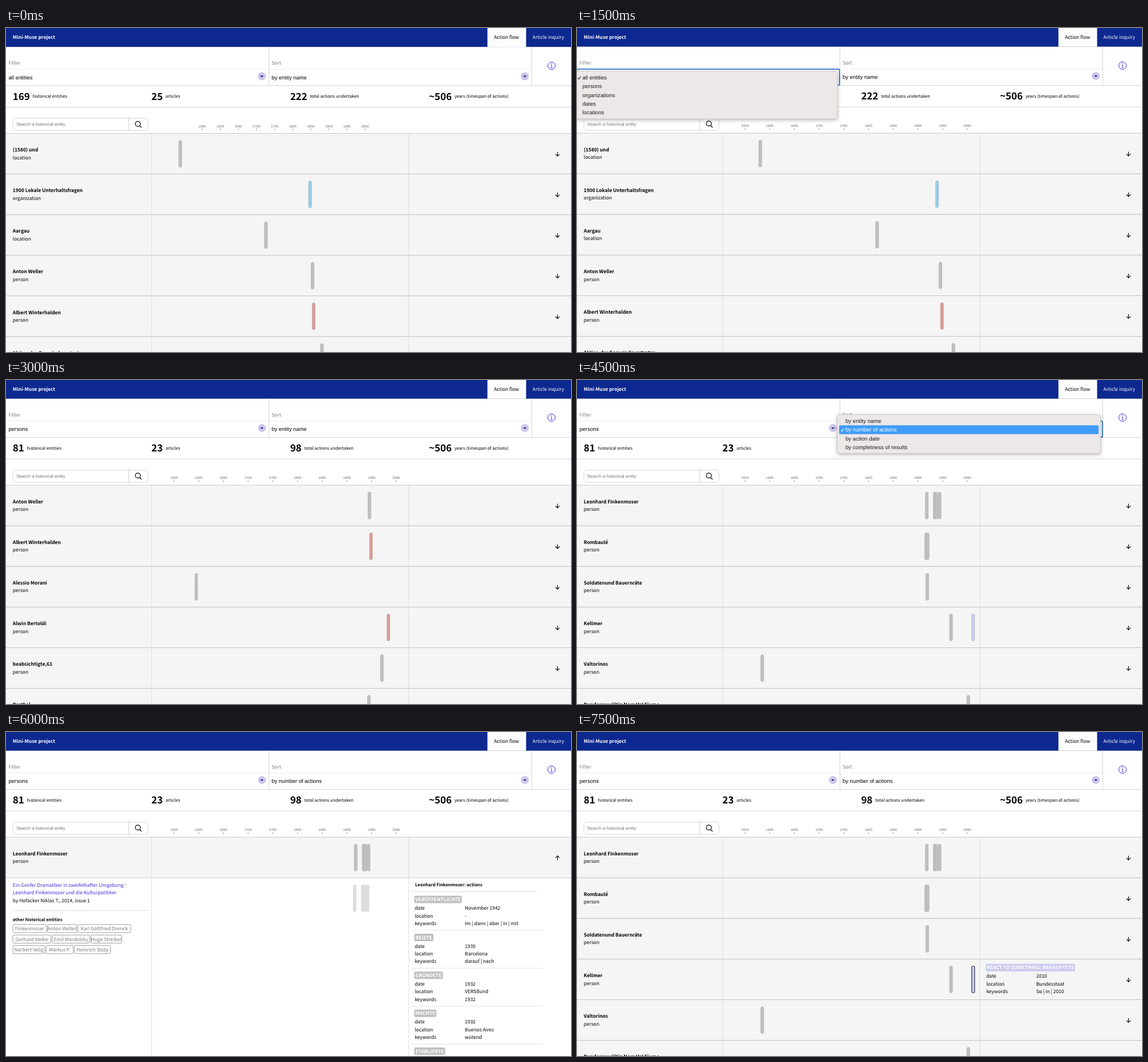
Recreate the animation shown at these times as an HTML page. Size 987 px wide and 567 px high, loop 9000 ms.

```html
<!DOCTYPE html>
<html lang="en">
<head>
<meta charset="utf-8">
<title>Action flow</title>
<style>
  html, body { margin: 0; width: 100%; height: 100%; overflow: hidden; background: #fff; }
  svg { display: block; width: 987px; height: 567px; }
  text { font: 8.43px "Noto Sans CJK JP", "Noto Sans CJK SC", "Noto Sans CJK", sans-serif; text-rendering: geometricPrecision; white-space: pre; }
  .bold { font-weight: 700; }
  .note { font-size: 7.55px; }
  .noteBold { font-size: 7.55px; font-weight: 700; }
  .count { font-size: 16.87px; font-weight: 700; }
  .control, .option, .hint, .year { font-family: "Liberation Sans", Arial, sans-serif; }
  .control { font-size: 9.43px; }
  .option { font-size: 9.62px; }
  .hint { font-size: 7.85px; }
  .year { font-size: 5.89px; text-anchor: middle; }
  .chip { text-anchor: middle; }
  .menu { filter: drop-shadow(0 2px 3px rgba(0, 0, 0, .28)); }
</style>
</head>
<body>
<svg id="stage" viewBox="0 0 987 567"></svg>
<script>
const STEP = 1500;
const TOP = 184.1, ROW = 71.1;
const GREY = '#c0c0c0', BLUE = '#8fcff0', RED = '#dc9a97', LILAC = '#cacaee';

const escapeText = s => s.replace(/&/g, '&amp;').replace(/</g, '&lt;');
const text = (x, y, s, cls = '', fill = '#000') =>
  `<text x="${x}" y="${y}" class="${cls}" fill="${fill}">${escapeText(s)}</text>`;
const rect = (x, y, w, h, fill, extra = '') =>
  `<rect x="${x}" y="${y}" width="${w}" height="${h}" fill="${fill}" ${extra}/>`;
const path = (d, stroke, width = 1, extra = '') =>
  `<path d="${d}" fill="none" stroke="${stroke}" stroke-width="${width}" ${extra}/>`;
const hline = (x1, x2, y, color = '#c8c8c8', width = .8) => path(`M${x1} ${y}H${x2}`, color, width);
const vline = (x, y1, y2, color = '#c8c8c8', width = .8) => path(`M${x} ${y1}V${y2}`, color, width);

function header() {
  return rect(0, -2, 987, 34.7, '#0d298f') + rect(841, -2, 67.6, 34.7, '#fcfcfd') +
    text(11.8, 19, 'Mini-Muse project', 'bold', '#fff') +
    text(852.4, 19, 'Action flow') + text(919.8, 19, 'Article inquiry', '', '#fff');
}

function select(x, label, value) {
  return text(x + 4.6, 63.8, label, '', '#777') + text(x + 4.6, 89.4, value, 'control') +
    `<circle cx="${x + 447}" cy="84.1" r="7" fill="#cdc6ec"/>` +
    `<path d="M${x + 444} 82.9h6l-3 3.2z" fill="#32207c"/>`;
}

function controls(filter, sort) {
  return select(0, 'Filter', filter) + select(459.4, 'Sort', sort) +
    hline(0, 918.5, 71.8, '#e9e9e9') + vline(459.3, 32.7, 100.5) + vline(918.5, 32.7, 100.5) +
    hline(0, 987, 100.5) +
    '<circle cx="953" cy="65.8" r="6.5" fill="none" stroke="#3b2bd6"/>' +
    '<circle cx="953" cy="62.5" r=".85" fill="#3b2bd6"/>' +
    path('M951.7 64.9H953.2V69.2M951.4 69.2H954.7', '#3b2bd6', .9);
}

function stats(entities, articles, actions) {
  const items = [[11.8, entities, 'historical entities'], [254, articles, 'articles'],
    [496.4, actions, 'total actions undertaken'], [738.8, '~506', 'years (timespan of actions)']];
  return items.map(([x, n, label]) =>
    text(x, 125.2, n, 'count') + text(x + n.length * 9.95 + 4.8, 121.8, label, 'note')).join('') +
    hline(0, 987, 138);
}

function search() {
  return rect(12, 157.4, 236, 21.6, '#fff', 'rx="5" stroke="#c8c8c8" stroke-width=".8"') +
    vline(214.5, 157.4, 179) + text(18, 170.9, 'Search a historical entity', 'hint', '#757575') +
    '<circle cx="230.3" cy="167.3" r="4.4" fill="none" stroke="#000" stroke-width="1.2"/>' +
    path('M233.4 170.5L236.7 174', '#000', 1.2);
}

function axis(start, gap) {
  return Array.from({ length: 10 }, (_, i) => {
    const x = start + i * gap;
    return text(x, 173.3, String(1550 + i * 50), 'year', '#666') + vline(x, 175.1, 178.6, '#777', .7);
  }).join('');
}

function bar(x, top, fill = GREY, stroke = '#a9a9a9', width = .6) {
  return rect(x - 2.6, top + 12.2, 5.2, 47, fill, `rx="2.4" stroke="${stroke}" stroke-width="${width}"`);
}

function beads(x, top) {
  return Array.from({ length: 13 }, (_, i) =>
    rect(x - 2.6, top + 12.2 + i * 3.58, 5.2, 4, GREY, 'rx="2" stroke="#a9a9a9" stroke-width=".5"')).join('');
}

function arrow(top, up) {
  const y = top + 36.2, s = up ? -1 : 1;
  return path(`M963.4 ${y - 3.7 * s}V${y + 3.5 * s}M959.9 ${y + .1 * s}L963.4 ${y + 3.6 * s}L966.9 ${y + .1 * s}`, '#000', 1.15);
}

// A mark is [x, colour, beaded]
function row([name, type, ...marks], i, open) {
  const y = TOP + i * ROW;
  return rect(0, y, 987, ROW, '#f5f5f5') + vline(254.4, y, y + ROW, '#dadada') + vline(703.5, y, y + ROW, '#dadada') +
    hline(0, 987, y, '#bdbdbd') + hline(0, 987, y + ROW, '#bdbdbd') +
    text(11.8, y + 31.7, name, 'bold') + text(11.8, y + 45.1, type) +
    marks.map(([x, fill, beaded]) => beaded ? beads(x, y) : bar(x, y, fill)).join('') + arrow(y, open);
}
const rows = list => list.map((r, i) => row(r, i)).join('');

function menu(x, y, w, options, checked, highlight) {
  const h = options.length * 15.3 + 6.8;
  return `<g class="menu">${rect(x, y, w, h, '#ece8e7', 'rx="3.5" stroke="#bdb9b8" stroke-width=".6"')}</g>` +
    options.map((label, i) => {
      const mid = y + 11 + i * 15.3, on = i === checked, color = on && highlight ? '#fff' : '#1c1c1c';
      return (on && highlight ? rect(x + 3.3, mid - 7.6, w - 6.6, 15.5, '#419cf9', 'rx="2.5"') : '') +
        (on ? path(`M${x + 6.6} ${mid + .9}l1.7 2.1l3.1-4.9`, color, 1.1) : '') +
        text(x + 14.4, mid + 3.5, label, 'option', color);
    }).join('');
}
const focusRing = x => rect(x, 71.9, 459, 28.2, 'none', 'rx="1.5" stroke="#0f62cf" stroke-width="1.5"');

function badge(x, mid, w, label, fill) {
  return rect(x, mid - 6.5, w, 13, fill, 'rx="2"') +
    `<text x="${x + w / 2}" y="${mid + 3.1}" class="bold chip" fill="#fff">${label}</text>`;
}

function action(x, mid, valueX, [label, w, ...values], fill = GREY) {
  return badge(x, mid, w, label, fill) + ['date', 'location', 'keywords'].map((key, i) => {
    const y = mid + 18.2 + i * 13.3;
    return text(x + .7, y, key) + text(valueX, y, values[i]);
  }).join('');
}

function details() {
  const chips = [
    [12, 58.5, 'Finkenmoser'], [72.5, 50.8, 'Anton Weller'], [125.5, 92.5, 'Karl Gottfried Drenck'],
    [12, 66.6, 'Gerhard Melke'], [81, 65, 'Emil Wardolsky'], [148.3, 54, 'Hugo Streiber'],
    [12, 56, 'Norbert Velig'], [70, 47.4, 'Markus P.'], [119.6, 63, 'Heinrich Stolp']];
  const actions = [
    ['VERÖFFENTLICHTE', 83, 'November 1942', '-', 'Im | dann | aber | in | mit'],
    ['REISTE', 33.4, '1935', 'Barcelona', 'darauf | nach'],
    ['GRÜNDETE', 50, '1932', 'VERSBund', '1932'],
    ['MACHTE', 38.5, '1932', 'Buenos Aires', 'wütend'],
    ['ETABLIERTE', 54, '', '', '']];
  const y = TOP + ROW;
  return vline(254.4, y, 567, '#dadada') + vline(703.5, y, 567, '#dadada') +
    text(11.8, 270.9, 'Ein Genfer Dramatiker in zweifelhafter Umgebung :', '', '#3c2bdd') +
    text(11.8, 284.3, 'Leonhard Finkenmoser und die Kulturpolitiker', '', '#3c2bdd') +
    text(11.8, 298.2, 'by Hofacker Niklas T., 2014, issue 1') +
    hline(12, 248, 312.5, '#d5d5d5') + text(11.8, 331, 'other historical entities', 'noteBold') +
    chips.map(([x, w, label], i) => {
      const mid = 344 + Math.floor(i / 3) * 18.35;
      return rect(x, mid - 7.1, w, 14.2, '#fff', 'rx="2.2" stroke="#858585" stroke-width=".8"') +
        text(x + w / 2, mid + 3.2, label, 'chip', '#777');
    }).join('') +
    [609.2, 623.3, 625.9, 631.7].map(x => bar(x, y, '#dedede', '#d0d0d0')).join('') +
    text(714.8, 270.2, 'Leonhard Finkenmoser: actions', 'noteBold') + hline(709, 928, 279.5, '#dadada') +
    actions.map((a, i) => {
      const mid = 293 + i * 66.4;
      return action(713.2, mid, 801.6, a) + hline(709, 938, mid + 53.9, '#dadada');
    }).join('');
}

const anton = ['Anton Weller', 'person'], albert = ['Albert Winterhalden', 'person'];
const allRows = xs => rows([
  ['(1580) und', 'location', [xs[0]]],
  ['1900 Lokale Unterhaltsfragen', 'organization', [xs[1], BLUE]],
  ['Aargau', 'location', [xs[2]]],
  [...anton, [xs[3]]],
  [...albert, [xs[4], RED]],
  ['Aktion der Gemeindevertreter', 'organization', [xs[5]]]]);

const personRows = rows([
  [...anton, [634.9]],
  [...albert, [637.6, RED]],
  ['Alessio Morani', 'person', [332.4, GREY, true]],
  ['Alwin Bertoldi', 'person', [668, RED]],
  ['beabsichtigte,61', 'person', [656.6]],
  ['Barthel', 'person', [634.1]]]);

const leader = ['Leonhard Finkenmoser', 'person', [611], [624.9], [627.5], [633.4]];
const rankedRows = rows([
  leader,
  ['Rombaulé', 'person', [610], [612.6]],
  ['Soldatenund Bauernräte', 'person', [611.8]],
  ['Kellmer', 'person', [653.4], [692.1, LILAC]],
  ['Valtorinos', 'person', [323.6]],
  ['Bundesanwältin Nora Val Fiume', 'person', [683.6]]]);

const wideAxis = axis(293.5, 43.15);
const page = (filter, sort, counts, scale, body) =>
  header() + controls(filter, sort) + stats(...counts) + search() + scale + body;
const all = ['169', '25', '222'], people = ['81', '23', '98'];
const byName = 'by entity name', byCount = 'by number of actions';

const scenes = [
  `<g transform="translate(0 .4)">${page('all entities', byName, all, axis(342.8, 31.62),
    allRows([304.4, 531.2, 454.2, 535.5, 537.4, 552]))}</g>`,
  page('all entities', byName, all, wideAxis, allRows([320.2, 629, 524.3, 634.9, 637.6, 657.5])) +
    focusRing(-.4) + menu(-5, 75.6, 460, ['all entities', 'persons', 'organizations', 'dates', 'locations'], 0),
  page('persons', byName, people, wideAxis, personRows),
  page('persons', byCount, people, wideAxis, rankedRows) + focusRing(458.9) +
    menu(454.6, 60.6, 460, [byName, byCount, 'by action date', 'by completness of results'], 1, true),
  page('persons', byCount, people, wideAxis, row(leader, 0, true) + details()),
  page('persons', byCount, people, wideAxis, rankedRows) + bar(692.1, TOP + 3 * ROW, LILAC, '#22223c', 1) +
    action(714.2, 412.2, 802.3, ['REACT TO SOMETHING: BEHAUPTETE', 156, '2010', 'Bundesstaat', 'So | in | 2010'], LILAC)
];

const stage = document.getElementById('stage');
stage.innerHTML = scenes.map(s => `<g display="none">${s}</g>`).join('');
const layers = [...stage.children];
const start = performance.now();
let shown = -1;

function draw(now) {
  const index = Math.floor(Math.max(0, now - start) / STEP) % layers.length;
  if (index !== shown) {
    layers.forEach((g, i) => g.setAttribute('display', i === index ? 'inline' : 'none'));
    shown = index;
  }
  requestAnimationFrame(draw);
}
draw(start);
</script>
</body>
</html>
```
